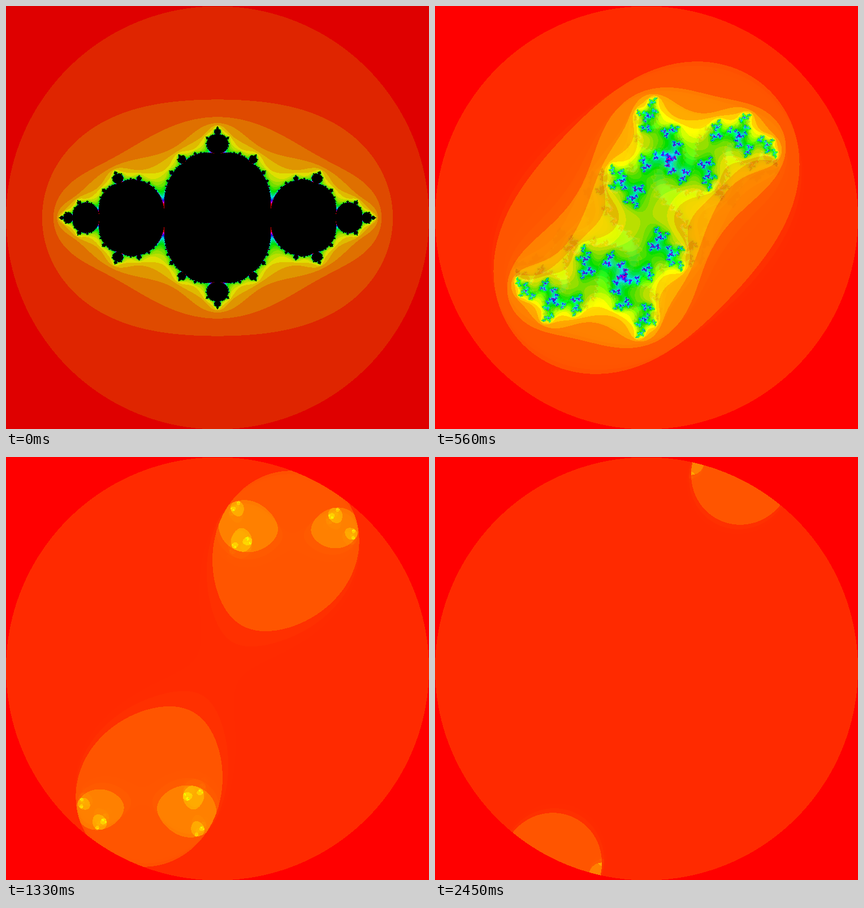
Write an HTML page with a canvas that moves like this. It is 748 px wide and 748 px high and loops after 2520 ms.

```html
<!DOCTYPE html>
<html>
<head>
<meta charset="utf-8">
<title>Julia sets</title>
<style>
html, body { margin: 0; width: 100%; height: 100%; overflow: hidden; background: #000; }
canvas { display: block; width: 748px; height: 748px; }
</style>
</head>
<body>
<canvas id="stage" width="748" height="748"></canvas>
<script>
const SIZE = 748, STEPS = 36, STEP_MS = 70, MAX = 100;
const ALPHA = 0.876; // each picture is painted slightly translucent over the last
const ctx = document.getElementById('stage').getContext('2d');
const image = ctx.createImageData(SIZE, SIZE);
const cache = [];

// Ten degrees of hue per iteration; points that never escape are black.
const palette = Array.from({ length: MAX + 1 }, (_, k) => {
  if (k === MAX) return [0, 0, 0];
  const h = Math.min(k * 10, 360) / 60;
  const channel = shift => {
    const p = (shift + h) % 6;
    return 255 * (1 - Math.max(0, Math.min(p, 4 - p, 1)));
  };
  return [channel(5), channel(3), channel(1)];
});

function escapeTime(x, y, cx, cy) {
  let k = 0, xx = x * x, yy = y * y;
  while (k < MAX && xx + yy <= 4) {
    y = 2 * x * y + cy;
    x = xx - yy + cx;
    xx = x * x;
    yy = y * y;
    k++;
  }
  return k;
}

function julia(n) {
  if (cache[n]) return cache[n];
  const map = new Uint8Array(SIZE * SIZE);
  const cx = -0.75 + 0.1 * n, cy = 0.1 * n, unit = SIZE / 4;
  let i = 0;
  for (let py = 0; py < SIZE; py++) {
    const y = py / unit - 2;
    for (let px = 0; px < SIZE; px++) {
      map[i++] = escapeTime((px + 0.5) / unit - 2, y, cx, cy);
    }
  }
  return cache[n] = map;
}

function draw(n) {
  const rest = 1 - ALPHA;
  const now = julia(n);
  const last = n > 0 ? julia(n - 1) : null;
  const older = n > 1 ? julia(n - 2) : null;
  const black = palette[MAX], out = image.data;
  for (let i = 0, o = 0; i < now.length; i++, o += 4) {
    const a = palette[now[i]];
    const b = last ? palette[last[i]] : black;
    const c = older ? palette[older[i]] : black;
    for (let j = 0; j < 3; j++) {
      out[o + j] = ALPHA * a[j] + rest * (ALPHA * b[j] + rest * c[j]);
    }
    out[o + 3] = 255;
  }
  ctx.putImageData(image, 0, 0);
}

const start = performance.now();
let shown = -1;
function tick() {
  const n = Math.floor((performance.now() - start) / STEP_MS) % STEPS;
  if (n !== shown) draw(shown = n);
  requestAnimationFrame(tick);
}
tick();
</script>
</body>
</html>
```
